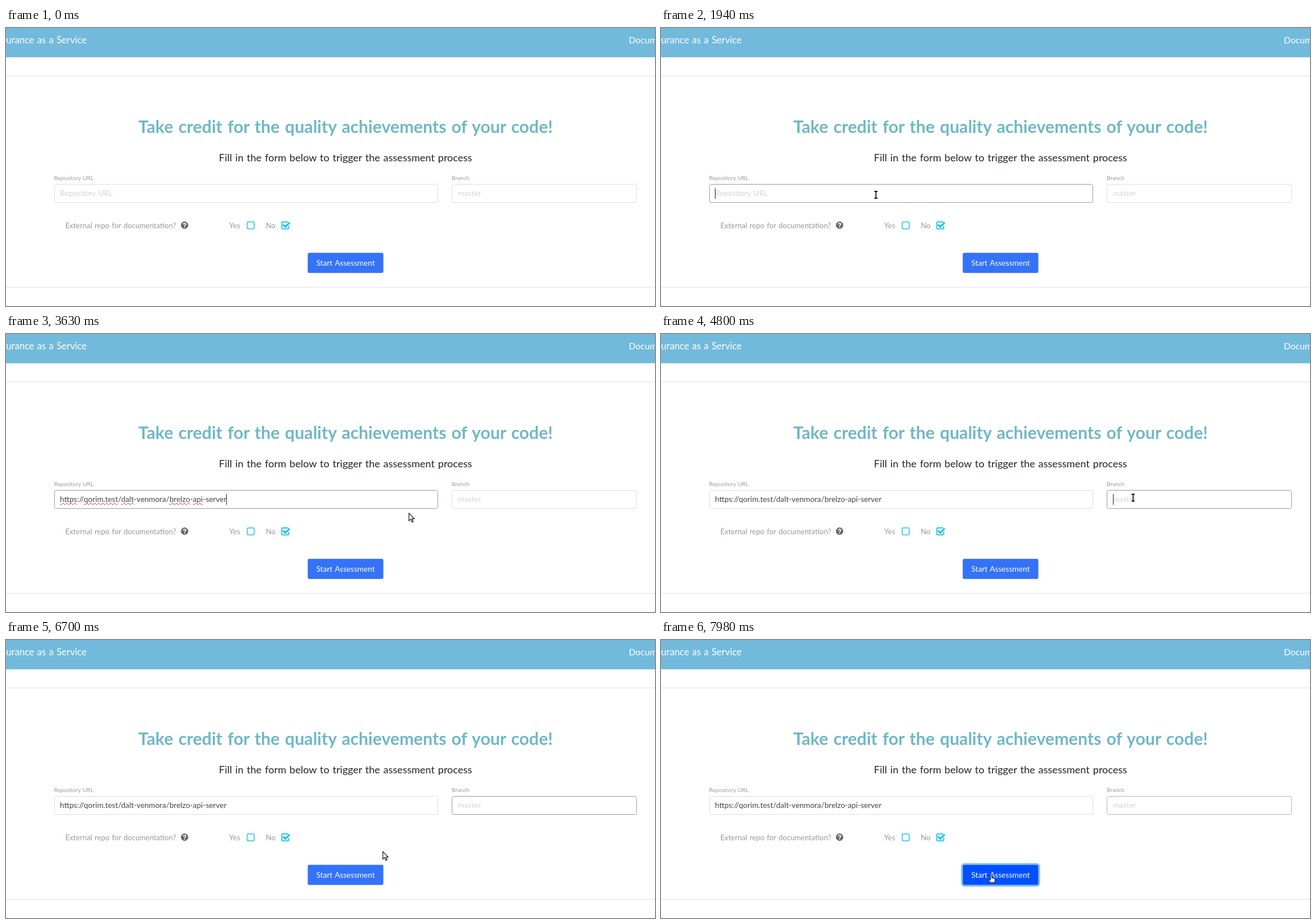
Animation, 1143 px wide and 490 px high, one loop 8000 ms. Source, as an HTML page:

```html
<!DOCTYPE html>
<html lang="en">
<head>
<meta charset="utf-8">
<title>Assessment form</title>
<style>
html, body { margin: 0; width: 100%; height: 100%; overflow: hidden; background: #fff; }
svg { position: absolute; left: 0; top: 0; }
text, #url { font-family: Lato, "Open Sans", sans-serif; word-spacing: .065em; }

.nav { font-size: 16.6px; fill: #fff; }
.title { font-size: 30.1px; font-weight: 700; fill: #70b8c6; }
.lead { font-size: 18.05px; fill: #212529; }
.label { font-size: 10.1px; fill: #9a9a9a; }
.row { font-size: 13.1px; fill: #9a9a9a; }
.hint { font-size: 13.5px; fill: #d4d4d4; }
.mid { text-anchor: middle; }
.field { fill: #fff; stroke: #ddd; }
.caret { fill: #222; }

#url { position: absolute; left: 95px; top: 275px; height: 33px; line-height: 33px;
  font-size: 13.5px; white-space: nowrap; color: #444; }
#url u { text-decoration: underline wavy #d8232a 1px; text-underline-offset: 1px;
  text-decoration-skip-ink: none; }
#url i { position: absolute; left: 100%; top: 7px; width: 1px; height: 19px; background: #222; }

/* One shared 8 s clock; 1% is 80 ms */
.cut { animation: 8s step-end infinite; }
.ease { animation: 8s linear infinite; }

#repo { animation-name: repo; }
@keyframes repo {
  0%, 21.2% { stroke: #ddd; }
  24.25%, 56.2% { stroke: #9a9a9a; }
  60%, 100% { stroke: #ddd; }
}
#branch { animation-name: branch; }
@keyframes branch {
  0%, 56.2% { stroke: #ddd; }
  60%, 98.9% { stroke: #9a9a9a; }
  99.75%, 100% { stroke: #b4b4b4; }
}
#hint { animation-name: hint; }
@keyframes hint { 0% { opacity: 1; } 28%, 100% { opacity: 0; } }
#url { animation-name: pasted; }
@keyframes pasted { 0% { opacity: 0; } 28%, 100% { opacity: 1; } }
#url u { animation-name: spell; }
@keyframes spell {
  0% { text-decoration-color: transparent; }
  28.875% { text-decoration-color: #d8232a; }
  56.375%, 100% { text-decoration-color: transparent; }
}

#caret1 { animation-name: caret1; }
@keyframes caret1 { 0% { opacity: 0; } 21.375% { opacity: 1; } 28%, 100% { opacity: 0; } }
#url i { animation-name: caret2; }
@keyframes caret2 {
  0% { opacity: 0; }
  28% { opacity: 1; } 35.5% { opacity: 0; }
  43% { opacity: 1; } 50.375%, 100% { opacity: 0; }
}
#caret3 { animation-name: caret3; }
@keyframes caret3 {
  0% { opacity: 0; }
  56.375% { opacity: 1; } 63% { opacity: 0; }
  70.25% { opacity: 1; } 77.75% { opacity: 0; }
  85% { opacity: 1; } 90.875%, 100% { opacity: 0; }
}

#button { fill: #3472f7; animation-name: hover; }
@keyframes hover {
  0%, 86.3% { fill: #3472f7; }
  88.2%, 100% { fill: #0050ff; }
}
#ring { animation-name: ring; }
@keyframes ring { 0% { opacity: 0; } 99% { opacity: .5; } 99.75%, 100% { opacity: 1; } }

#pointer { animation-name: path; }
@keyframes path {
  0% { transform: translate(537px, 444px); }
  11.5125% { transform: translate(537px, 444px); animation-timing-function: steps(7, jump-start); }
  15.15% { transform: translate(378.5px, 294px); }
  35.5% { transform: translate(378.5px, 294px); animation-timing-function: steps(6, jump-start); }
  38.775% { transform: translate(400px, 345px); animation-timing-function: steps(4, jump-start); }
  40.9625% { transform: translate(460px, 367px); animation-timing-function: steps(5, jump-start); }
  43.6875% { transform: translate(580px, 350px); animation-timing-function: steps(4, jump-start); }
  45.875% { transform: translate(709px, 315px); animation-timing-function: steps(8, jump-start); }
  50.375% { transform: translate(831.5px, 288.5px); }
  65% { transform: translate(831.5px, 288.5px); animation-timing-function: steps(8, jump-start); }
  69% { transform: translate(865px, 392px); }
  74.75% { transform: translate(865px, 392px); animation-timing-function: steps(9, jump-start); }
  79.25% { transform: translate(757px, 373px); animation-timing-function: steps(10, jump-start); }
  84.25% { transform: translate(663px, 372px); animation-timing-function: steps(1, jump-start); }
  85% { transform: translate(650px, 376px); animation-timing-function: steps(4, jump-start); }
  87.625% { transform: translate(600px, 408px); animation-timing-function: steps(5, jump-start); }
  90.875%, 100% { transform: translate(582px, 414.5px); }
}
#arrow { animation-name: arrow; }
@keyframes arrow {
  0% { opacity: 0; }
  11% { opacity: 1; } 14.625% { opacity: 0; }
  36.05% { opacity: 1; } 48.6875% { opacity: 0; }
  65.5% { opacity: 1; } 86.3%, 100% { opacity: 0; }
}
#beam { animation-name: beam; }
@keyframes beam {
  0% { opacity: 0; }
  14.625% { opacity: 1; } 36.05% { opacity: 0; }
  48.6875% { opacity: 1; } 65.5%, 100% { opacity: 0; }
}
#hand { animation-name: hand; }
@keyframes hand { 0% { opacity: 0; } 86.3%, 100% { opacity: 1; } }
</style>
</head>
<body>
<svg width="1143" height="490">
  <rect width="1143" height="51" fill="#72badc"/>
  <path d="M0 51H1143" stroke="#69b0d2"/>
  <text class="nav" x="142" y="27" text-anchor="end">Assurance as a Service</text>
  <text class="nav" x="1097" y="27" style="font-size:15.6px">Documentation</text>
  <path d="M0 84.5H1143M0 457H1143" stroke="#ddd"/>

  <text class="title mid" x="598" y="184.5">Take credit for the quality achievements of your code!</text>
  <text class="lead mid" x="598" y="235">Fill in the form below to trigger the assessment process</text>

  <text class="label" x="84.5" y="267.5">Repository URL</text>
  <rect id="repo" class="field ease" x="85.5" y="275.5" width="675" height="32" rx="3"/>
  <text id="hint" class="hint cut" x="95" y="296">Repository URL</text>
  <rect id="caret1" class="caret cut" x="95" y="282" width="1" height="19"/>

  <text class="label" x="785" y="267.5">Branch</text>
  <rect id="branch" class="field ease" x="785.5" y="275.5" width="325" height="32" rx="3"/>
  <text class="hint" x="796" y="296">master</text>
  <rect id="caret3" class="caret cut" x="796" y="282" width="1" height="19"/>

  <text class="row" x="104.5" y="352.5">External repo for documentation?</text>
  <circle cx="314.5" cy="347.5" r="6.5" fill="#666"/>
  <path d="M312.3 346.2Q312.3 344 314.5 344T316.7 345.9Q316.7 347 314.6 347.9V349" fill="none" stroke="#fff" stroke-width="1.7"/>
  <rect x="313.6" y="350" width="1.9" height="1.8" fill="#fff"/>

  <text class="row" x="393" y="352.5">Yes</text>
  <text class="row" x="457.5" y="352.5">No</text>
  <g fill="none" stroke="#23c3e6" stroke-width="1.5">
    <rect x="424.7" y="341.7" width="12.4" height="12.4" rx="2"/>
    <path d="M498 349V352Q498 354.1 495.9 354.1H487.7Q485.7 354.1 485.7 352V343.7Q485.7 341.7 487.7 341.7H497" stroke-width="1.9"/>
    <path d="M487.8 346.4L492 350.4L499.6 342.8" stroke-width="3.2"/>
  </g>

  <rect id="ring" class="cut" x="529.7" y="394.7" width="136.6" height="38.6" rx="4.5" fill="none" stroke="#86c5df" stroke-width="2.8"/>
  <rect id="button" class="ease" x="531.4" y="396.3" width="133.2" height="35.4" rx="3"/>
  <text class="mid" x="598" y="418.7" font-size="13.6" fill="#fff">Start Assessment</text>
</svg>

<div id="url" class="cut"><u class="cut">https</u>://<u class="cut">qorim.test</u>/<u class="cut">dalt</u>-venmora/<u class="cut">brelzo</u>-<u class="cut">api</u>-server<i class="cut"></i></div>

<svg width="1143" height="490">
  <g id="pointer" class="ease">
    <path id="arrow" class="cut" d="M.7 .9V14.2L3.8 11.4L6 16.4L8.2 15.4L6.1 10.6H10Z" fill="#fff" stroke="#111" stroke-width="1.2"/>
    <g id="beam" class="cut" fill="none">
      <path d="M-2.5-6H2.5M0-6V6M-2.5 6H2.5" stroke="#fff" stroke-width="3.4" stroke-linecap="square"/>
      <path d="M-2.8-6H2.8M0-6V6M-2.8 6H2.8" stroke="#111" stroke-width="1.8"/>
    </g>
    <path id="hand" class="cut" d="M-1.5 .7Q-.4-.6 .7 .7V5L6.2 6V10L5 13H-2L-4.8 8.6Q-4.4 7-3 7.6L-1.5 9Z" fill="#fff" stroke="#111" stroke-linejoin="round"/>
  </g>
</svg>
</body>
</html>
```
